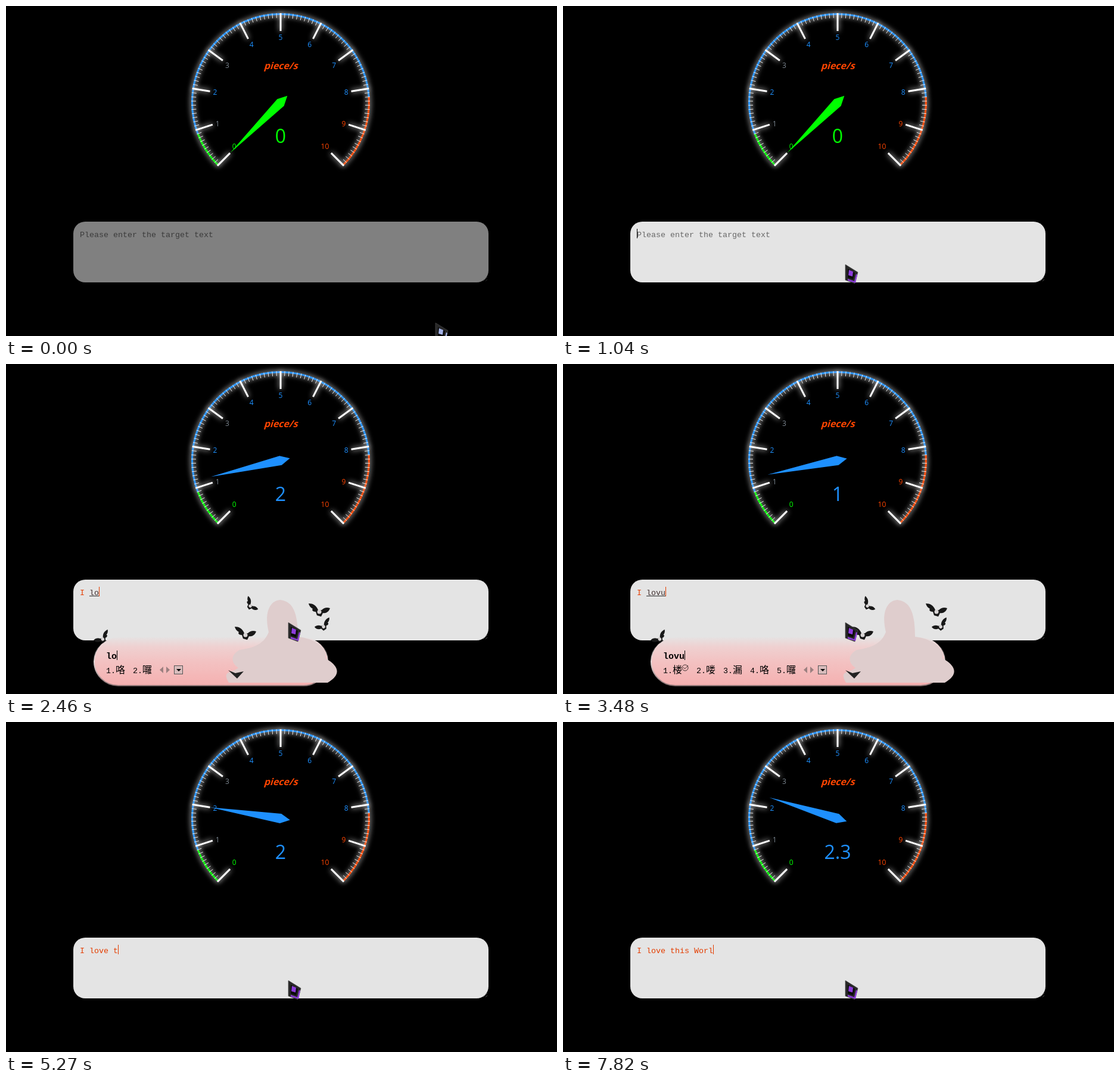
Write an HTML page that moves like this. It is 925 px wide and 554 px high and loops after 8 s.

```html
<!DOCTYPE html>
<html lang="en">
<head>
<meta charset="utf-8">
<title>Typing speed gauge</title>
<style>
  html, body { margin: 0; width: 100%; height: 100%; overflow: hidden; background: #000; }
  svg { display: block; }
  text { white-space: pre; }
  .sans { font-family: "Open Sans", "Noto Sans", sans-serif; }
  .mono { font: 13.333px "Liberation Mono", monospace; }
  .cjk { font: 16px "Noto Sans CJK SC", "Noto Sans CJK", sans-serif; }
  .glow { filter: drop-shadow(0 0 5px #fff); }
</style>
</head>
<body>
<svg width="925" height="554" viewBox="0 0 925 554">
  <defs>
    <linearGradient id="rose" x2="0" y2="1">
      <stop stop-color="#e6e2e2"/><stop offset=".2" stop-color="#efd0d0"/>
      <stop offset=".5" stop-color="#f3c2c2"/><stop offset="1" stop-color="#f5b0b0"/>
    </linearGradient>
    <linearGradient id="rim" x2="0" y2="1">
      <stop offset=".1" stop-color="#eee" stop-opacity="0"/><stop offset=".5" stop-color="#e4d8d8"/>
      <stop offset="1" stop-color="#8a7272"/>
    </linearGradient>
    <g id="bird">
      <path d="M-2 1C-5-7-11-10-18-10C-17-6-15-3-11-1C-13 1-11 4-6 4L-4 10L3 12L6 6C11 7 16 4 18-2C13-4 8-3 4 1Z" fill="#181818"/>
      <circle cy="4" r="3.5" fill="#d8d4d4"/>
    </g>
  </defs>

  <g id="gauge" class="sans"></g>
  <path id="needle"/>
  <g class="sans" text-anchor="middle">
    <g id="labels" font-size="12"></g>
    <text transform="translate(461 106) skewX(-16)" font-size="16" font-weight="bold" fill="#ff4500">piece/s</text>
    <text id="value" x="461" y="230" font-size="32"></text>
  </g>

  <g id="field">
    <rect x="113" y="362" width="697" height="102" rx="20" fill="#fff"/>
    <path d="M801 462L808 455M805 462L808 459" stroke="#555"/>
    <text id="hint" class="mono" x="124" y="388" fill="#757575">Please enter the target text</text>
    <text id="typed" class="mono" x="124" y="388" fill="#ff4500"></text>
    <text id="draft" class="mono" x="140" y="388" fill="#4a3838"></text>
    <rect id="underline" x="140" y="389" height="1" fill="#333"/>
    <rect id="caret" y="374" width="1" height="16"/>
  </g>

  <g id="ime">
    <rect id="panel" x="148" y="459" height="81" rx="40.5" fill="url(#rose)" stroke="url(#rim)" stroke-width="2"/>
    <use href="#bird" transform="translate(161 459) rotate(-25) scale(-.8 .8)"/>
    <g id="figure">
      <path fill="#dfcdcd" d="M460 396C440 398 434 422 441 450C434 468 420 476 392 480C374 490 380 504 390 510
        C378 520 362 514 374 535L540 535C566 520 556 505 536 494C540 476 515 460 490 458C490 425 485 398 460 396Z"/>
      <use href="#bird" transform="translate(412 404) rotate(40) scale(.75)"/>
      <use href="#bird" transform="translate(526 412)"/>
      <use href="#bird" transform="translate(532 438) rotate(-20) scale(-.8 .8)"/>
      <use href="#bird" transform="translate(402 451)"/>
      <path d="M373 514L385 519L399 516L388 528Z" fill="#222"/>
    </g>
    <text id="reading" x="168" y="495" font-family="Liberation Mono, monospace" font-size="15" font-weight="bold"></text>
    <rect id="bar" y="481" width="1" height="16"/>
    <g id="choices"></g>
    <g id="pager">
      <path d="M6 508V519L0 513.5ZM11 508V519L17 513.5Z" fill="#9b8080"/>
      <rect x="24.5" y="506.5" width="14" height="14" fill="#d8bcbc" stroke="#555"/>
      <path d="M28 512H36L32 516Z"/>
    </g>
  </g>

  <g id="pointer">
    <path d="M0 0L21 13L16 32L0 26Z" fill="#282828" stroke="#484848" stroke-width=".7"/>
    <path d="M4 7L16 14L13 25L4 22Z" fill="#0a0a0a"/>
    <path d="M6 9L13 12L12 20L5 18Z"/>
    <path d="M4 24L15 28L18 16L20 17L17 31L4 27Z"/>
  </g>
</svg>
<script>
const LOOP = 8000, CX = 461, CY = 162;
const $ = id => document.getElementById(id);
const clamp = p => Math.min(1, Math.max(0, p));
const easeOut = p => 1 - (1 - clamp(p)) ** 3;
const lerp = (a, b, p) => a + (b - a) * p;
const hue = v => v <= 0.9 ? '#0f0' : v <= 8.2 ? '#1e90ff' : '#ff4500';

// Point at radius r for gauge value v; turn is an extra angle in degrees.
function at(v, r, turn = 0) {
  const a = (135 + 27 * v + turn) * Math.PI / 180;
  return [CX + r * Math.cos(a), CY + r * Math.sin(a)];
}
const ray = (v, a, b) => `M${at(v, a)}L${at(v, b)}`;

function buildGauge() {
  const arc = (a, b) => `<path class="glow" fill="none" stroke-width="3" stroke="${hue(b)}"
    d="M${at(a, 148.5)}A148.5 148.5 0 ${b - a > 6.67 ? 1 : 0} 1 ${at(b, 148.5)}"/>`;
  let ticks = '', splits = '', labels = '';
  for (let i = 0; i <= 100; i++) ticks += ray(i / 10, 150, 142);
  for (let v = 0; v <= 10; v++) {
    splits += ray(v, 150, 120);
    const [x, y] = at(v, 115), dx = (x - CX) / 115, dy = (y - CY) / 115;
    const anchor = dx < -.4 ? 'start' : dx > .4 ? 'end' : 'middle';
    const drop = dy < -.4 ? 9.5 : dy > .4 ? -3 : 4.5;
    const fill = v == 1 || v == 3 ? '#7c8690' : hue(v);
    labels += `<text x="${x}" y="${y + drop}" text-anchor="${anchor}" fill="${fill}">${v}</text>`;
  }
  $('gauge').innerHTML = arc(0, .9) + arc(.9, 8.2) + arc(8.2, 10) +
    `<path class="glow" d="${ticks}" stroke="#eee"/><path class="glow" d="${splits}" stroke="#fff" stroke-width="3"/>`;
  $('labels').innerHTML = labels;
}

// time, committed text, text being composed, caret shown
const typing = [
  [0, '', '', 0], [1040, '', '', 1], [1370, 'I', '', 1], [1680, 'I ', '', 1], [2140, 'I ', '', 0],
  [2310, 'I ', 'l', 1], [2460, 'I ', 'lo', 1], [3020, 'I ', 'lov', 1], [3240, 'I ', 'lovu', 1],
  [3870, 'I ', 'lov', 1], [4030, 'I ', 'love', 1], [4340, 'I love', '', 1], [4500, 'I love ', '', 1],
  [5120, 'I love ', '', 0], [5270, 'I love t', '', 1], [5410, 'I love th', '', 1], [5500, 'I love thi', '', 1],
  [5640, 'I love this', '', 1], [5870, 'I love this ', '', 1], [6420, 'I love this ', '', 0],
  [6660, 'I love this W', '', 1], [7110, 'I love this Wo', '', 1], [7340, 'I love this Wor', '', 1],
  [7820, 'I love this Worl', '', 1]
];
// first visible, start of the 300 ms sweep, new speed
const speeds = [[0, -300, 0], [2460, 2384, 2], [3368, 3368, 1], [4345, 4345, 2], [6420, 6345, 2.4], [7340, 7290, 2.3]];
// candidates per reading, whether the first is ticked, and how far the figure moves right
const menus = {
  l: [['了', '来', '里', '老', '楼'], false, 90],
  lo: [['咯', '囉'], false, 0],
  lov: [['咯', '囉'], false, 0],
  lovu: [['楼', '喽', '漏', '咯', '囉'], true, 101],
  love: [['love', '楼', '漏', '咯'], true, 73]
};

function drawSpeed(t) {
  const i = speeds.findLastIndex(s => s[0] <= t), [, start, goal] = speeds[i];
  const v = lerp(i ? speeds[i - 1][2] : 0, goal, easeOut((t - start) / 300));
  $('needle').setAttribute('d', `M${at(v, -16)}L${at(v, 8, -90)}L${at(v, 120)}L${at(v, 8, 90)}Z`);
  $('needle').setAttribute('fill', hue(goal));
  $('value').setAttribute('fill', hue(goal));
  $('value').textContent = goal;
}

let shown;
function drawTyping(t) {
  const step = typing.findLast(s => s[0] <= t);
  if (step === shown) return;
  shown = step;
  const [, text, draft, caret] = step;
  $('hint').style.display = text ? 'none' : '';
  $('typed').textContent = text;
  $('draft').textContent = draft;
  $('underline').setAttribute('width', 8 * draft.length);
  $('caret').setAttribute('x', 124 + 8 * (text + draft).length);
  $('caret').setAttribute('fill', text ? '#ff4500' : '#000');
  $('caret').style.display = caret ? '' : 'none';
  $('ime').style.display = draft ? '' : 'none';
  if (draft) drawMenu(draft);
}

function drawMenu(draft) {
  const [words, ticked, shift] = menus[draft];
  let x = 168, html = '';
  words.forEach((word, i) => {
    const latin = word.length > 1;
    html += `<text class="mono" x="${x}" y="519">${i + 1}.</text>` +
      `<text class="${latin ? 'mono' : 'cjk'}" x="${x + 16}" y="519">${word}</text>`;
    x += 29 + (latin ? 8 * word.length : 16);
    if (ticked && !i) {
      html += `<g transform="translate(${x - 8} 510)" fill="none" stroke="#433">
        <circle r="5"/><path d="M-3-1L-.5 2L5-4"/></g>`;
      x += 11;
    }
  });
  $('choices').innerHTML = html;
  $('pager').setAttribute('transform', `translate(${x} 0)`);
  $('figure').setAttribute('transform', `translate(${shift} 0)`);
  $('panel').setAttribute('width', 392 + shift);
  $('reading').textContent = draft;
  $('bar').setAttribute('x', 168 + 9 * draft.length);
}

function drawPointer(t) {
  const p = easeOut((t - 70) / 480), y = lerp(532, 434, p);
  $('pointer').setAttribute('transform', `translate(${lerp(721, 474, p)} ${y})`);
  $('pointer').setAttribute('fill', y < 464 ? '#8d3ddb' : '#a4b2e6');
  $('field').setAttribute('opacity', lerp(.5, .895, clamp((t - 230) / 400)));
}

function frame(now) {
  const t = now % LOOP;
  drawSpeed(t);
  drawTyping(t);
  drawPointer(t);
  requestAnimationFrame(frame);
}
buildGauge();
frame(performance.now());
</script>
</body>
</html>
```
